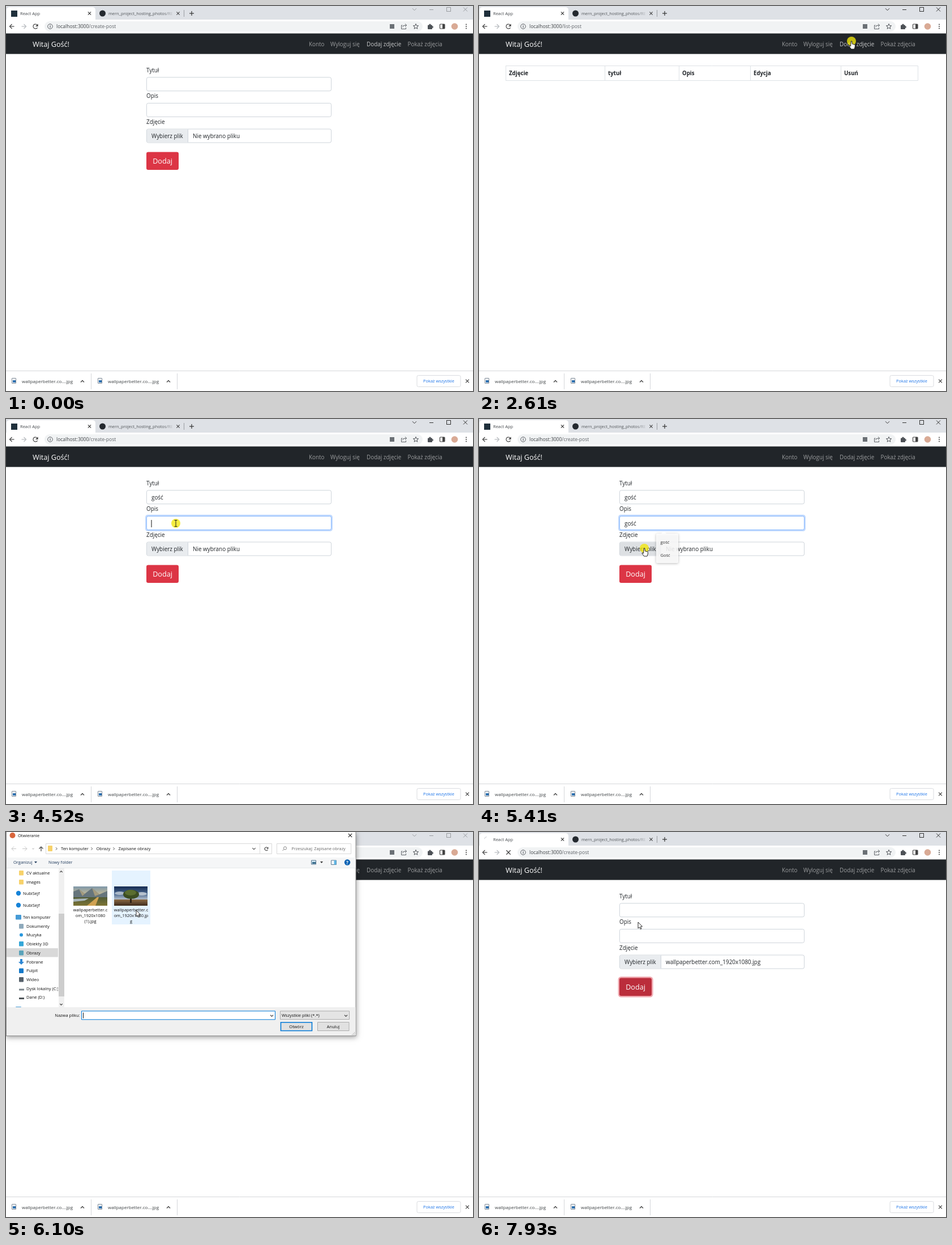
Write an HTML page with a canvas that moves like this. It is 825 px wide and 679 px high and loops after 8 s.

```html
<!DOCTYPE html>
<html lang="pl">
<head>
<meta charset="utf-8">
<title>Dodaj zdjęcie</title>
<style>
  html, body { margin: 0; width: 100%; height: 100%; overflow: hidden; background: #fff; }
  canvas { display: block; }
</style>
</head>
<body>
<canvas id="stage" width="825" height="679"></canvas>
<script>
const c = document.getElementById('stage').getContext('2d');
const LOOP = 8000, FONT = '"Open Sans", "Noto Sans", sans-serif';
const INK = '#212529', GREY = '#5f6368';
const BODY = 9.9, UI = 7.5;
const FIELD_Y = [125.4, 171, 216.6], FIELD_H = 24.8;

// Pointer stops: time, x, y
const PATH = [
  [70, 806, 678], [830, 742, 66], [1080, 742, 66], [1300, 722, 92], [1560, 722, 92],
  [1950, 610, 190], [2330, 650, 92], [2540, 658, 62], [2760, 658, 62], [3170, 560, 96],
  [3370, 316, 188], [3440, 297, 145], [4290, 297, 145], [4480, 300, 184], [5000, 300, 184],
  [5340, 292, 228], [5480, 292, 228], [6080, 230, 138], [6440, 230, 138],
  [6710, 237, 148], [7050, 277, 271], [7660, 277, 271], [7930, 281, 159]
];
const CLICKS = [[900, 1040], [2560, 2720], [3320, 3430], [4490, 4600], [5370, 5480], [6170, 6290], [7650, 7720]];
const LINKS = [['Konto', 535, 28], ['Wyloguj się', 573, 54], ['Dodaj zdjęcie', 637, 62], ['Pokaż zdjęcia', 709.5, 62]];

const within = (t, a, b) => t >= a && t < b;
const clamp = v => Math.max(0, Math.min(1, v));
const inside = (p, x, y, w, h) => p && p.x >= x && p.x < x + w && p.y >= y && p.y < y + h;

function text(s, x, y, size = UI, color = '#111', weight = 400, align = 'left') {
  c.font = `${weight} ${size}px ${FONT}`;
  c.fillStyle = color;
  c.textAlign = align;
  c.fillText(s, x, y);
}
function rect(x, y, w, h, fill) {
  c.fillStyle = fill;
  c.fillRect(x, y, w, h);
}
function box(x, y, w, h, r, fill, stroke, lw = 1) {
  c.beginPath();
  c.roundRect(x, y, w, h, r);
  if (fill) { c.fillStyle = fill; c.fill(); }
  if (stroke) { c.strokeStyle = stroke; c.lineWidth = lw; c.stroke(); }
}
function trace(pts) {
  c.beginPath();
  for (let i = 0; i < pts.length; i += 2) c.lineTo(pts[i], pts[i + 1]);
}
function line(color, lw, ...pts) {
  trace(pts);
  c.strokeStyle = color;
  c.lineWidth = lw;
  c.stroke();
}
function poly(fill, ...pts) {
  trace(pts);
  c.closePath();
  c.fillStyle = fill;
  c.fill();
}
function ellipse(x, y, rx, ry, fill) {
  c.beginPath();
  c.ellipse(x, y, rx, ry, 0, 0, 7);
  c.fillStyle = fill;
  c.fill();
}
const disc = (x, y, r, fill) => ellipse(x, y, r, r, fill);
function arc(x, y, r, a, b, color, lw = 1) {
  c.beginPath();
  c.arc(x, y, r, a, b);
  c.strokeStyle = color;
  c.lineWidth = lw;
  c.stroke();
}
function cross(x, y, r, color, lw = 1.1) {
  line(color, lw, x - r, y - r, x + r, y + r);
  line(color, lw, x + r, y - r, x - r, y + r);
}
const chevron = (x, y, r, color, dir = 1, lw = 1.1) =>
  line(color, lw, x - r, y - dir * r / 2, x, y + dir * r / 2, x + r, y - dir * r / 2);
function arrow(x, y, dir, color, lw = 1.2) {
  line(color, lw, x - 4 * dir, y, x + 4 * dir, y);
  line(color, lw, x, y - 4, x + 4 * dir, y, x, y + 4);
}
function reload(x, y, r, color) {
  arc(x, y, r, 0.5, 5.6, color, 1.2);
  poly(color, x + r + .6, y - r - .6, x + r + .6, y, x, y);
}
function gradient(x0, y0, x1, y1, ...colors) {
  const g = c.createLinearGradient(x0, y0, x1, y1);
  colors.forEach((color, i) => g.addColorStop(i / (colors.length - 1), color));
  return g;
}

function pointer(t) {
  if (t < PATH[0][0]) return null;
  let i = PATH.findIndex(k => k[0] > t);
  if (i < 0) i = PATH.length;
  const a = PATH[i - 1], b = PATH[i] || a;
  const u = a === b ? 0 : (t - a[0]) / (b[0] - a[0]), e = u * u * (3 - 2 * u);
  return { x: a[1] + (b[1] - a[1]) * e, y: a[2] + (b[2] - a[2]) * e };
}

function browser(t, list, active) {
  const loading = t >= 7790, win = active ? '#333' : '#9a9da1';
  rect(0, 0, 825, 24, '#dee1e6');
  box(1, 2, 157, 28, 5, '#fff');
  rect(0, 24, 825, 24, '#fff');
  if (loading) {
    const a = 3.3 + (t - 7930) / 160;
    arc(14, 13, 4.5, a, a + 1.3, '#c8cbd0');
  } else rect(9, 8, 11, 11, '#20303c');
  text('React App', 25, 16, 7.5, '#45494d');
  cross(147.5, 13, 2.6, '#333');
  disc(170.5, 13, 5.5, '#24292f');
  text('mern_project_hosting_photos/RE', 181, 16, 7.4, gradient(278, 0, 297, 0, '#505458', '#50545800'));
  cross(304, 13, 2.6, '#444');
  line('#9a9da2', 1, 314.5, 7, 314.5, 19);
  line('#333', 1.2, 324, 13, 332, 13);
  line('#333', 1.2, 328, 9, 328, 17);
  chevron(721.5, 6, 3.5, win, 1, 1);
  line(win, 1, 748, 6.5, 755, 6.5);
  c.strokeRect(778.5, 2.5, 7, 7);
  cross(811.5, 6, 3.5, win, 1);

  arrow(10.5, 36, -1, '#444');
  arrow(31.5, 36, 1, '#b8bbbf');
  if (loading) cross(52, 36, 3.7, '#444', 1.3);
  else reload(52, 36, 4, '#444');
  box(68, 27, 668, 18, 9, '#f1f3f4');
  arc(78, 36, 4.3, 0, 7, GREY);
  rect(77.5, 35, 1.2, 3.4, GREY);
  rect(77.5, 33.4, 1.2, 1.1, GREY);
  text('localhost:3000', 89, 39, 8.5, '#3c4043');
  const w = c.measureText('localhost:3000').width;
  text(list ? '/list-post' : '/create-post', 89 + w, 39, 8.5, '#5f6368');
  rect(678, 32, 8, 8, '#6b7075');
  line(GREY, 1, 700.5, 34, 698.5, 34, 698.5, 40.5, 706.5, 40.5, 706.5, 38);
  line(GREY, 1, 700.8, 37.5, 702, 34.5, 707.5, 34);
  line(GREY, 1, 705, 31.5, 707.8, 34, 705, 36.5);
  const star = [];
  for (let i = 0; i <= 10; i++) {
    const a = i * Math.PI / 5 - Math.PI / 2, r = i % 2 ? 2.1 : 4.9;
    star.push(724 + r * Math.cos(a), 36.3 + r * Math.sin(a));
  }
  line('#505459', 1, ...star);
  box(745, 33.5, 8, 7.5, 1, '#4d5156');
  disc(749, 33, 1.6, '#4d5156');
  disc(753.4, 37, 1.6, '#4d5156');
  box(766.5, 32, 8.5, 8, 1, null, '#444', 1.2);
  rect(771, 32, 4, 8, '#444');
  disc(792.5, 36, 5.8, '#d9aa95');
  for (let y = 32.5; y < 41; y += 3.5) disc(813, y, 1, '#444');

  line('#d5d7da', 1, 0, 643.5, 825, 643.5);
  for (const x of [0, 152]) {
    box(x + 10.5, 656.5, 7, 9, .5, '#fff', '#7b8794');
    rect(x + 12, 660, 5, 4, '#2b6fb0');
    text('wallpaperbetter.co....jpg', x + 28, 665, 8, '#3c4043');
    chevron(x + 135, 662, 3, '#444', -1, 1.3);
    line('#d5d7da', 1, x + 150.5, 648, x + 150.5, 676);
  }
  box(726, 651.5, 77, 20, 2.5, '#fff', '#dadce0');
  text('Pokaż wszystkie', 764.5, 664, 7.4, '#1a73e8', 400, 'center');
  cross(815, 661.5, 2.9, '#444', 1.2);
}

function navbar(t, p) {
  rect(0, 48.4, 825, 36.2, INK);
  text('Witaj Gość!', 47, 72, 12.6, '#fff');
  LINKS.forEach(([label, x, w], i) => {
    let k = inside(p, x - 5, 53, w + 10, 27) ? 1 : 0;
    if (i === 2 && t < 200) k = 1 - clamp((t - 70) / 130);
    text(label, x, 70.5, BODY, `rgba(255,255,255,${.55 + .2 * k})`);
  });
}

function table() {
  box(47.5, 105.5, 728, 26, 0, '#fff', '#dee2e6');
  [['Zdjęcie', 47], ['tytuł', 222], ['Opis', 353], ['Edycja', 479], ['Usuń', 639]].forEach(([s, x]) => {
    line('#dee2e6', 1, x + .5, 105, x + .5, 132);
    text(s, x + 6, 122, 9.7, INK, 700);
  });
}

function field(y, focus, value, caret) {
  if (focus) box(246, y - 2.2, 331, FIELD_H + 4.4, 4.5, '#c2dafe');
  box(248.4, y + .4, 326.2, FIELD_H - .8, 3, '#fff', focus ? '#86b7fe' : '#ced4da');
  if (value) text(value, 257, y + 16.5, BODY, INK);
  if (caret) {
    const w = value ? c.measureText(value).width : 0;
    rect(256.5 + w, y + 7, 1, 13, '#111');
  }
}

function form(t, p) {
  const word = 'gość', cleared = t >= 7790 || t < 3400;
  const typed = start => cleared || t < start ? '' : word.slice(0, 1 + Math.floor((t - start) / 140));
  const focus = within(t, 3400, 4520) ? 1 : within(t, 4520, 5480) ? 2 : within(t, 5480, 7650) ? 3 : 0;
  const [y1, y2, y3] = FIELD_Y;
  ['Tytuł', 'Opis', 'Zdjęcie'].forEach((s, i) => text(s, 248, FIELD_Y[i] - 8.9, BODY, INK));
  field(y1, focus === 1, typed(3840), focus === 1);
  field(y2, focus === 2, typed(4660), focus === 2 && t < 5150);
  field(y3, focus === 3);
  const over = inside(p, 248, y3, 74, FIELD_H) && t < 6440;
  box(248.9, y3 + .9, 73, FIELD_H - 1.8, [2.5, 0, 0, 2.5], over ? '#dde0e3' : '#e9ecef');
  line('#ced4da', 1, 321.5, y3 + .9, 321.5, y3 + FIELD_H - .9);
  text('Wybierz plik', 257, y3 + 16.7, BODY, INK);
  text(t >= 6440 ? 'wallpaperbetter.com_1920x1080.jpg' : 'Nie wybrano pliku', 330, y3 + 16.7, BODY, INK);

  const k = clamp((t - 7030) / 150);
  if (t >= 7650) box(245.6, 255, 62, 36.6, 5.5, '#f0a9b0');
  box(248, 257.5, 57, 31.5, 3.2, `rgb(${220 - 33 * k},${53 - 8 * k},${69 - 10 * k})`);
  text('Dodaj', 276.5, 278, 12.6, '#fff', 400, 'center');
}

function suggestions(t) {
  if (!within(t, 4660, 5480)) return;
  c.save();
  c.globalAlpha = t < 5400 ? 1 : .86;
  c.shadowColor = 'rgba(0,0,0,.3)';
  c.shadowBlur = 4;
  c.shadowOffsetY = 1;
  box(313, 202, 39, 52, 2, '#fff');
  c.shadowColor = 'transparent';
  poly('#fff', 322, 202, 326.5, 198, 331, 202);
  text('gość', 320.5, 219.5);
  text('Gość', 320.5, 243);
  c.restore();
}

function landscape(x, y) {
  rect(x, y, 60, 34, gradient(0, y, 0, y + 20, '#7f98aa', '#e0c78c'));
  poly('#66757c', x, y + 22, x, y + 9, x + 10, y + 5, x + 20, y + 13, x + 33, y + 3, x + 46, y + 14, x + 60, y + 8, x + 60, y + 22);
  poly('#a49a7d', x + 10, y + 5, x + 16, y + 17, x + 20, y + 13);
  poly('#a49a7d', x + 33, y + 3, x + 38, y + 17, x + 46, y + 14);
  rect(x, y + 19, 60, 15, gradient(0, y + 19, 0, y + 34, '#505b36', '#7d7434'));
  poly('#a9b6ba', x, y + 22, x + 27, y + 21, x + 20, y + 25, x, y + 27);
  poly('#d0a252', x + 42, y + 19, x + 45, y + 19, x + 39, y + 34, x + 24, y + 34);
}
function tree(x, y) {
  rect(x, y, 59, 26, gradient(0, y, 0, y + 26, '#152a50', '#4a6890', '#d3d9dd'));
  ellipse(x + 10, y + 12, 9, 3, '#aab8c8');
  ellipse(x + 49, y + 13, 9, 3, '#b5c1ce');
  rect(x, y + 23, 59, 11, gradient(0, y + 23, 0, y + 34, '#8a6a45', '#3f2c1d'));
  rect(x + 28, y + 18, 3, 11, '#2c2217');
  ellipse(x + 30, y + 14, 14, 8, '#3c4d22');
  ellipse(x + 29, y + 11, 10, 5, '#5a6d30');
}

function sidebar() {
  const items = [
    ['CV aktualne', 72, 36, '#f7d26b'], ['images', 88, 36, '#f7d26b'],
    ['NubiSejf', 108, 30, '#1683d8', 1], ['NubiSejf', 129, 30, '#1683d8', 1],
    ['Ten komputer', 150, 30, '#469bd6'], ['Dokumenty', 166, 36, '#8eaabc'],
    ['Muzyka', 181.5, 36, '#2897dd', 1], ['Obiekty 3D', 197, 36, '#35a7d8'],
    ['Obrazy', 213, 36, '#5aa3ba'], ['Pobrane', 229, 36, '#2c86d3', 2],
    ['Pulpit', 244.5, 36, '#1479c9'], ['Wideo', 260, 36, '#56616b'],
    ['Dysk lokalny (C:)', 276, 36, '#7b858c', 3], ['Dane (D:)', 291.5, 36, '#4f5559', 3],
    ['Sieć', 312, 30, '#469bd6']
  ];
  c.save();
  c.beginPath();
  c.rect(1, 64, 91, 245);
  c.clip();
  rect(1, 205, 91, 15.5, '#d9d9d9');
  for (const [label, y, x, color, kind] of items) {
    const ix = x - 9, top = x < 36;
    if (kind === 1) disc(ix + (top ? 1 : 0), y, top ? 4.2 : 3, color);
    else if (kind === 2) {
      rect(ix - 2, y - 5, 4, 6, color);
      poly(color, ix - 5, y, ix + 5, y, ix, y + 5);
    } else if (kind === 3) rect(ix - 4, y + .5, 9, 3, color);
    else box(ix - 4, y - 4, top ? 10 : 8, 8.5, 1, color);
    text(label, x, y + 2.8);
  }
  c.restore();
  rect(93, 64, 10, 245, '#f0f0f0');
  rect(93, 144, 10, 146, '#cdcdcd');
  chevron(97.5, 70, 2.2, '#444', -1, 1.3);
  chevron(97.5, 304, 2.2, '#444', 1, 1.3);
}

function dialog(t, p) {
  const picked = t >= 6170;
  c.save();
  c.shadowColor = 'rgba(0,0,0,.4)';
  c.shadowBlur = 9;
  c.shadowOffsetY = 2;
  rect(0, 0, 618.5, 360, '#8c8c8c');
  c.restore();
  rect(1, 0, 616.5, 359, '#fff');
  disc(11.5, 6, 5, '#d9653b');
  text('Otwieranie', 21, 9);
  cross(608, 6, 3.2, '#222');

  arrow(14, 29.5, -1, '#c7c7c7', 1);
  arrow(33, 29.5, 1, '#c7c7c7', 1);
  chevron(48, 29.5, 1.6, '#c7c7c7');
  line('#444', 1.2, 62, 34, 62, 26);
  line('#444', 1.2, 58.5, 29.5, 62, 26, 65.5, 29.5);
  box(70.5, 20.5, 399, 18, 0, null, '#d9d9d9');
  line('#d9d9d9', 1, 448.5, 21, 448.5, 39);
  box(74, 24, 8, 10, 1, '#f7d26b');
  [['Ten komputer', 97], ['Obrazy', 159.5], ['Zapisane obrazy', 198.5]].forEach(([s, x]) => {
    line('#444', 1, x - 9, 27.3, x - 6.8, 29.5, x - 9, 31.7);
    text(s, x, 32);
  });
  chevron(438, 29.5, 2.6, '#444');
  reload(460, 29.8, 2.9, '#555');
  box(478.5, 20.5, 131, 18, 0, null, '#d9d9d9');
  arc(493, 28.5, 2.6, 0, 7, '#777', .9);
  line('#777', .9, 491, 30.5, 488.5, 33);
  text('Przeszukaj: Zapisane obrazy', 504.5, 32, 7.3, '#666');

  rect(1, 45, 616.5, 18, '#f5f6f7');
  line('#e6e8ea', 1, 1, 63.5, 617, 63.5);
  text('Organizuj', 13, 56, UI, '#1e395b');
  poly('#1e395b', 50, 52, 55, 52, 52.5, 55);
  text('Nowy folder', 75, 56, UI, '#1e395b');
  box(539.5, 50, 8, 7, 0, '#d4e9f6', '#5b7890');
  rect(541, 53, 6, 3, '#386d8c');
  poly('#333', 555, 52, 560, 52, 557.5, 55);
  box(574.5, 50, 9, 7.5, 0, '#fff', '#5b7890');
  rect(579.5, 50, 4, 7.5, '#61b7e5');
  disc(603, 53.5, 5.2, '#0b63b4');
  text('?', 603, 56.5, 8, '#fff', 700, 'center');
  sidebar();

  if (picked) rect(187, 68, 68, 95, '#cce8ff');
  else if (inside(p, 187, 68, 68, 95)) rect(187, 68, 68, 95, '#e5f3ff');
  landscape(119, 96);
  tree(191, 96);
  const caption = (x, rows) => rows.forEach((s, i) => text(s, x, 140 + i * 9.8, 7.4, '#111', 400, 'center'));
  caption(149, ['wallpaperbetter.c', 'om_1920x1080', '(1).jpg']);
  caption(221, ['wallpaperbetter.c', 'om_1920x1080.jp', 'g']);

  rect(1, 309, 616.5, 50, '#f0f0f0');
  text('Nazwa pliku:', 130.5, 326, UI, '#111', 400, 'right');
  box(133.5, 315.8, 342, 15, 0, '#fff', '#0078d7');
  if (picked) text('wallpaperbetter.com_1920x1080.jpg', 136, 326);
  else rect(136, 318.5, 1, 10, '#111');
  chevron(469.5, 324, 2.5, '#444');
  box(484.5, 315.8, 122, 14.7, 0, '#e4e4e4', '#adadad');
  text('Wszystkie pliki (*.*)', 487, 326);
  chevron(600.5, 324, 2.5, '#444');
  box(485.5, 335.8, 55, 14.7, 0, '#e1e1e1', '#0078d7', 1.6);
  text('Otwórz', 513, 346, UI, '#111', 400, 'center');
  box(550.5, 335.5, 55.5, 15, 0, '#e1e1e1', '#adadad');
  text('Anuluj', 578, 346, UI, '#111', 400, 'center');
  for (let i = 0; i < 3; i++) for (let j = 0; j <= i; j++) rect(611 + i * 2, 357 - j * 2, 1, 1, '#a0a0a0');
}

function cursor(p, kind) {
  c.save();
  c.translate(p.x, p.y);
  c.lineJoin = 'round';
  if (kind === 'beam') {
    line('#222', 1, 0, -5, 0, 5);
    line('#222', 1, -2.5, -5.5, 2.5, -5.5);
    line('#222', 1, -2.5, 5.5, 2.5, 5.5);
  } else {
    trace(kind === 'hand'
      ? [-.8, 0, .8, 0, 1.4, 5, 5.5, 6, 6.5, 7.5, 6, 11, 5, 14, -.5, 14, -4, 9, -3.5, 7.8, -1.4, 9]
      : [0, 0, 0, 11, 2.5, 8.8, 4.3, 12.3, 6, 11.5, 4.3, 8, 7.4, 7.6]);
    c.closePath();
    c.fillStyle = '#fff';
    c.fill();
    c.strokeStyle = '#111';
    c.lineWidth = .9;
    c.stroke();
  }
  c.restore();
}

function cursorKind(p, list, open) {
  if (open) return 'arrow';
  if (LINKS.some(([, x, w]) => inside(p, x - 5, 53, w + 10, 27))) return 'hand';
  if (list) return 'arrow';
  const [y1, y2, y3] = FIELD_Y;
  if ([y1, y2].some(y => inside(p, 248, y, 327, FIELD_H))) return 'beam';
  if (inside(p, 248, y3, 74, FIELD_H) || inside(p, 248, 257, 57, 32)) return 'hand';
  return 'arrow';
}

function draw(t) {
  const p = pointer(t), list = within(t, 1040, 2750), open = within(t, 5690, 6440);
  rect(0, 0, 825, 679, '#fff');
  browser(t, list, t >= 900 && !open);
  navbar(t, p);
  if (list) table();
  else {
    form(t, p);
    suggestions(t);
  }
  if (open) dialog(t, p);
  if (!p) return;
  if (CLICKS.some(([a, b]) => within(t, a, b))) disc(p.x, p.y, 8, 'rgba(242,232,10,.78)');
  cursor(p, cursorKind(p, list, open));
}

function tick(now) {
  draw(now % LOOP);
  requestAnimationFrame(tick);
}
requestAnimationFrame(tick);
</script>
</body>
</html>
```
